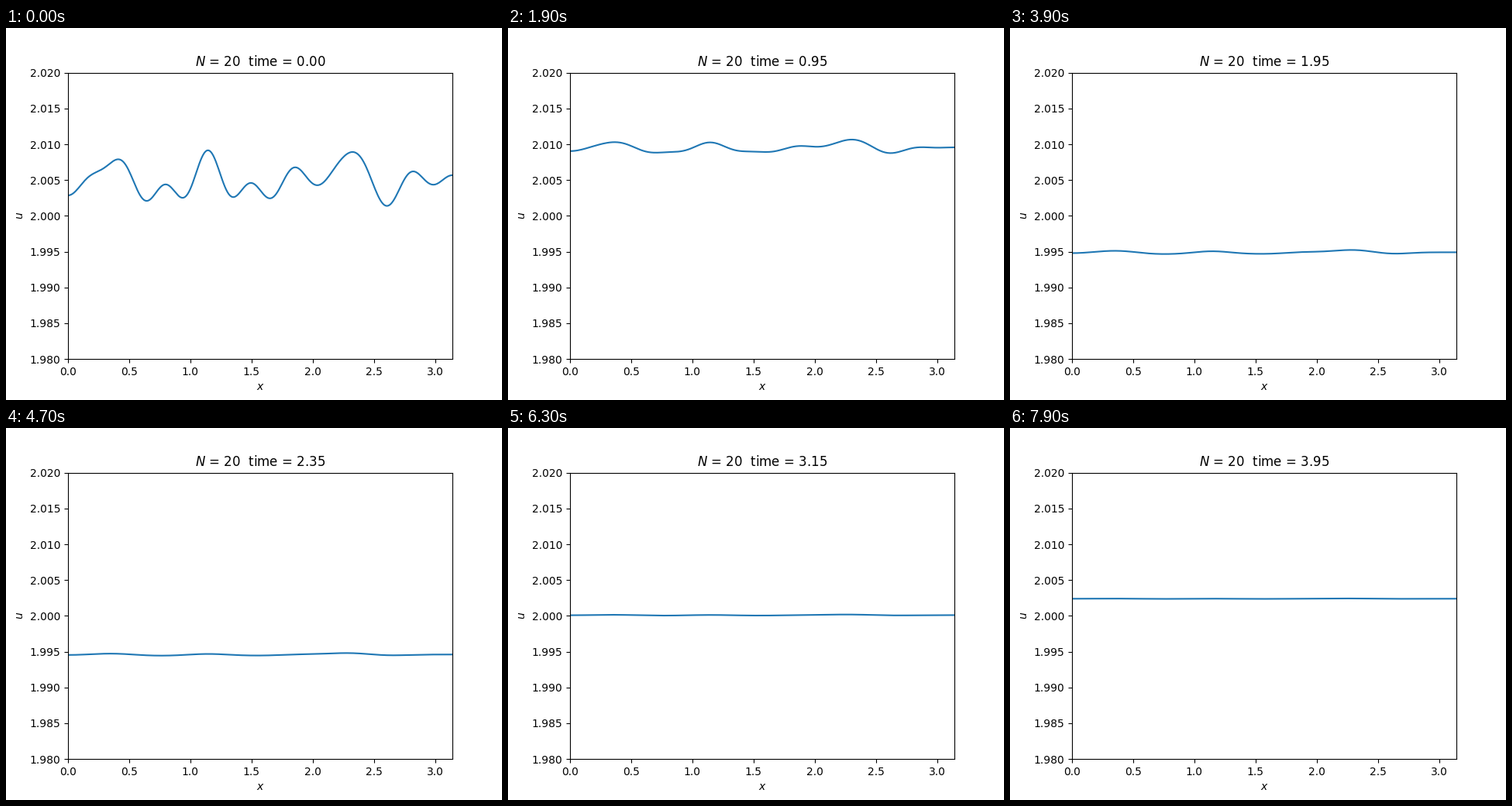
Animation of 640x480 px, one loop 8000 ms. Source, as a matplotlib script:

```python
import numpy as np
import matplotlib.pyplot as plt
from matplotlib.animation import FuncAnimation

FRAMES, INTERVAL, DT = 80, 100, 0.05
K = np.arange(21)                # cosine modes on [0, pi]
RATE = 0.9 + 0.0055 * K**2       # decay rate of each mode

# Turning points of the initial wave; heights in thousandths above 2
TURN_X = [0, 0.41, 0.643, 0.798, 0.937, 1.144, 1.35, 1.497, 1.649,
          1.857, 2.038, 2.325, 2.607, 2.82, 2.987, np.pi]
TURN_U = [2.86, 7.9, 2.1, 4.38, 2.52, 9.17, 2.64, 4.6, 2.42,
          6.77, 4.28, 8.92, 1.38, 6.2, 4.37, 5.68]
SHOULDER = (0.19, 5.72)


def fit_modes():
    """Least-squares cosine series through the points, flat at the turns."""
    xs = np.append(TURN_X, SHOULDER[0])
    us = np.append(TURN_U, SHOULDER[1])
    values = np.cos(np.outer(xs, K))
    slopes = np.sin(np.outer(TURN_X, K)) * K / 14
    goal = np.append(us, np.zeros(len(TURN_X)))
    return np.linalg.lstsq(np.vstack([values, slopes]), goal, rcond=1e-3)[0] / 1000


def swing(t):
    """Damped oscillation of the mean level."""
    return 0.01795 * np.exp(-0.51 * t) * np.sin(1.913 * (1.493 - t))


start = fit_modes()
x = np.linspace(0, np.pi, 300)
basis = np.cos(np.outer(x, K))


def profile(t):
    modes = start * np.exp(-RATE * t)
    modes[0] = swing(t) + (start[0] - swing(0)) * np.exp(-6 * t)
    return 2 + basis @ modes


fig, ax = plt.subplots(figsize=(6.4, 4.8), dpi=100)
line, = ax.plot(x, profile(0))
ax.set_xlim(0, np.pi)
ax.set_ylim(1.98, 2.02)
ax.set_xlabel("$x$")
ax.set_ylabel("$u$")
title = ax.set_title("")


def update(i):
    t = i * DT
    line.set_ydata(profile(t))
    title.set_text(f"$N$ = 20  time = {t:.2f}")
    return line, title


anim = FuncAnimation(fig, update, frames=FRAMES, interval=INTERVAL,
                     repeat=True, repeat_delay=0, blit=False)
plt.show()
```
